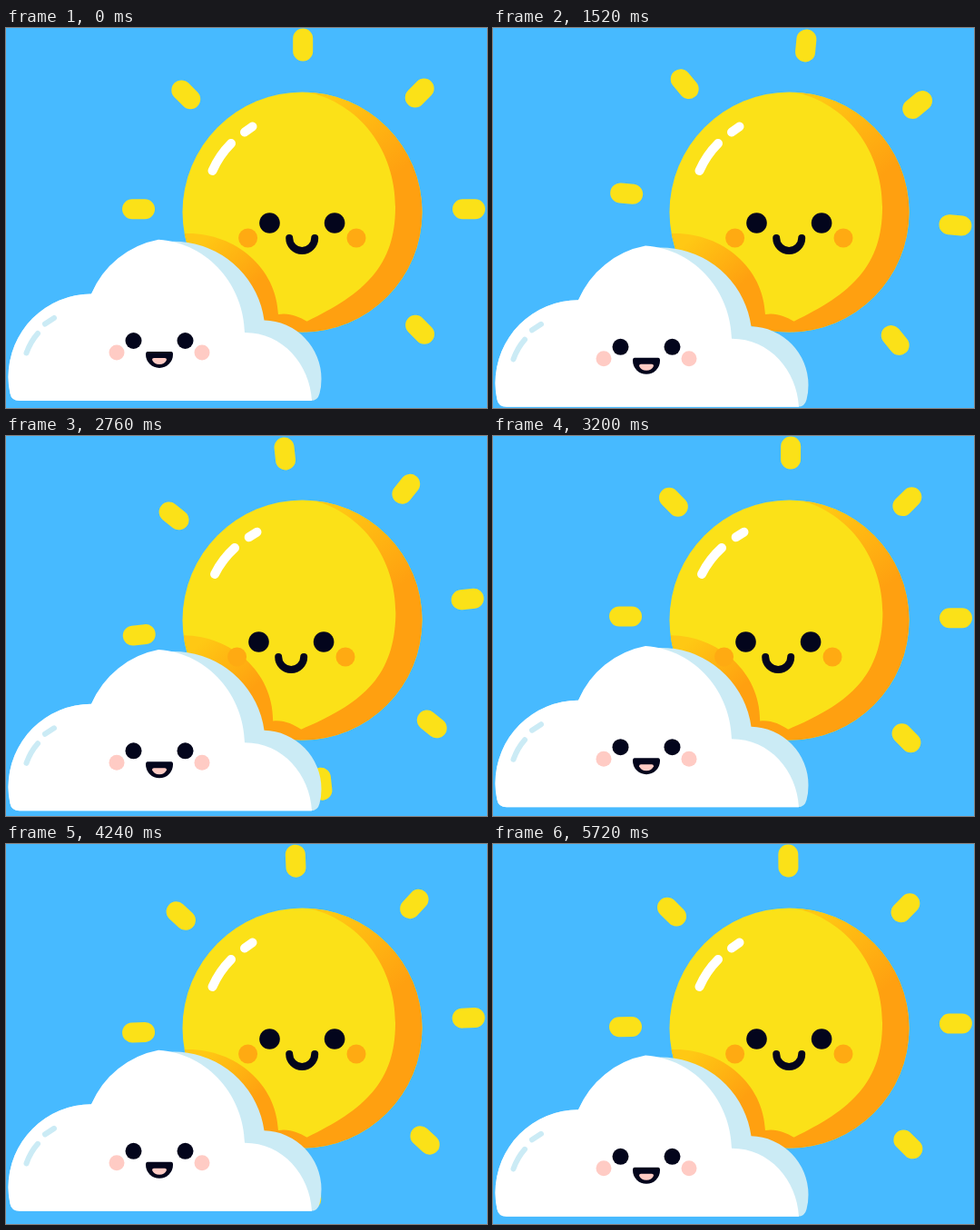
An HTML page with a canvas for the animation above (5760 ms loop, 530 by 418 pixels).

```html
<!DOCTYPE html>
<html lang="en">
<head>
<meta charset="utf-8">
<title>Sun and cloud</title>
<style>
html, body { margin: 0; width: 100%; height: 100%; overflow: hidden; background: #47baff; }
canvas { display: block; }
</style>
</head>
<body>
<canvas id="stage" width="530" height="418"></canvas>
<script>
const ctx = document.getElementById('stage').getContext('2d');
const LOOP = 5760;
const CX = 326.5, CY = 202.5, SUN_R = 132;
const YELLOW = '#fbe118', ORANGE = '#ffa010', AMBER = '#ffc814';
const INK = '#03051c', SHADE = '#cbebf5', PINK = '#ffcbc4';
const RAD = Math.PI / 180;

// [time, value] pairs
const SWING = [[0, 0], [600, 6.3], [960, 12.8], [1520, 5.5], [2400, -7],
  [2760, -6.2], [3640, 4.3], [4840, -10.4], [5400, -6]];
const BOB = [[0, 0], [600, 3.1], [920, 4.5], [1520, 6.8], [1850, 7.1], [2400, 5.2],
  [2760, 2.3], [3640, -5.4], [4100, -6.3], [4840, -4.5], [5400, -1.6]];
// [angle in degrees, distance from the sun's centre]
const RAYS = [[-1, 183.5], [44.9, 183], [89.5, 181.5], [135, 181],
  [181, 180.5], [225.2, 182], [270.2, 184], [314.6, 184]];

// Smooth periodic curve through the keys
function spline(keys, t) {
  const n = keys.length;
  const at = i => {
    const lap = Math.floor(i / n), k = keys[i - lap * n];
    return [k[0] + lap * LOOP, k[1]];
  };
  let i = 0;
  while (i < n - 1 && keys[i + 1][0] <= t) i++;
  const slope = j => {
    const a = at(j - 1), b = at(j + 1);
    return (b[1] - a[1]) / (b[0] - a[0]);
  };
  const a = at(i), b = at(i + 1), span = b[0] - a[0];
  const u = (t - a[0]) / span, v = 1 - u;
  return a[1] * (1 + 2 * u) * v * v + b[1] * (3 - 2 * u) * u * u +
    span * u * v * (slope(i) * v - slope(i + 1) * u);
}

function ramp(t, from, to) {
  const u = Math.min(1, Math.max(0, (t - from) / (to - from)));
  return u * u * (3 - 2 * u);
}

function ellipse(x, y, rx, ry, color) {
  ctx.fillStyle = color;
  ctx.beginPath();
  ctx.ellipse(x, y, rx, ry, 0, 0, 2 * Math.PI);
  ctx.fill();
}

function stroke(d, width, color) {
  ctx.lineWidth = width;
  ctx.lineCap = 'round';
  ctx.strokeStyle = color;
  ctx.stroke(new Path2D(d));
}

function fill(d, color) {
  ctx.fillStyle = color;
  ctx.fill(new Path2D(d));
}

function gradient(x0, y0, x1, y1) {
  const g = ctx.createLinearGradient(x0, y0, x1, y1);
  g.addColorStop(0, AMBER);
  g.addColorStop(1, ORANGE);
  return g;
}

function drawRays(swing) {
  RAYS.forEach(([angle, dist], i) => {
    const a = (angle + swing) * RAD;
    ctx.save();
    ctx.translate(CX + dist * Math.cos(a), CY + dist * Math.sin(a));
    ctx.rotate((i * 45 + swing) * RAD);
    stroke('M-7 0H7', 22, YELLOW);
    ctx.restore();
  });
}

function drawSun(look, lid) {
  ellipse(CX, CY, SUN_R, SUN_R, YELLOW);

  ctx.save();
  ctx.beginPath();
  ctx.arc(CX, CY, SUN_R, 0, 2 * Math.PI);
  ctx.clip();
  ctx.translate(CX, CY);
  ctx.rotate(3 * look * RAD);
  ctx.translate(-CX, -CY);
  fill('M185 226L197 226C250 224 298 262 300 315C312 313 322 317 332 323V345H185Z',
    gradient(222, 228, 272, 284));
  fill('M330 55V70C390 82 429 135 429 197C429 262 395 292 331 323V345H475V55Z',
    gradient(355, 80, 425, 165));
  stroke('M227.5 157Q235 140 248 127', 10, '#fff');
  stroke('M263 114.5L271.5 108.5', 10, '#fff');
  ctx.restore();

  ctx.save();
  ctx.translate(-12 * look, 12 * look);
  for (const side of [-1, 1]) {
    ellipse(326.3 + side * 59.7, 231, 10.5, 10.5, '#ffaa12');
    ellipse(326.3 + side * 35.8, 214.5, 11.3, 11.3 * lid, INK);
  }
  stroke('M312.2 231A14 14 0 0 0 340.2 231', 8, INK);
  ctx.restore();
}

function drawCloud(dy) {
  ctx.save();
  ctx.translate(0, dy);
  const left = 'M15 410Q6 410 4.5 402Q2.5 393 2.5 384A91.5 91.5 0 0 1 94 292.5';
  fill(left + 'A100.5 100.5 0 0 1 284.5 321.5A64.5 64.5 0 0 1 347.5 386' +
    'Q347.5 395 345.5 402Q343.5 410 336 410Z', SHADE);
  fill(left + 'A100.5 100.5 0 0 1 168 232.8C225 237 262 285 263 335' +
    'C305 335 335 370 337 410Z', '#fff');
  stroke('M22.5 357.5Q27 345 35 336', 6, SHADE);
  stroke('M43 325.5L53 319', 6, SHADE);

  for (const side of [-1, 1]) {
    ellipse(169 + side * 47, 357, 8.5, 8.5, PINK);
    ellipse(169 + side * 28.5, 344, 9, 9, INK);
  }
  fill('M156 356H182Q184 356 184 359A15 15 0 0 1 154 359Q154 356 156 356Z', INK);
  fill('M161 365Q161 363 163 363H175Q177 363 177 365Q175 370 169 370Q163 370 161 365Z', PINK);
  ctx.restore();
}

function draw(t) {
  ctx.fillStyle = '#47baff';
  ctx.fillRect(0, 0, 530, 418);
  const look = ramp(t, 1800, 2450) - ramp(t, 3280, 4000);
  const lid = Math.max(0.1, Math.min(1, Math.abs(t - 4920) / 120));
  drawRays(spline(SWING, t));
  drawSun(look, lid);
  drawCloud(spline(BOB, t));
}

const start = performance.now();
function tick(now) {
  draw(Math.max(0, now - start) % LOOP);
  requestAnimationFrame(tick);
}
draw(0);
requestAnimationFrame(tick);
</script>
</body>
</html>
```
